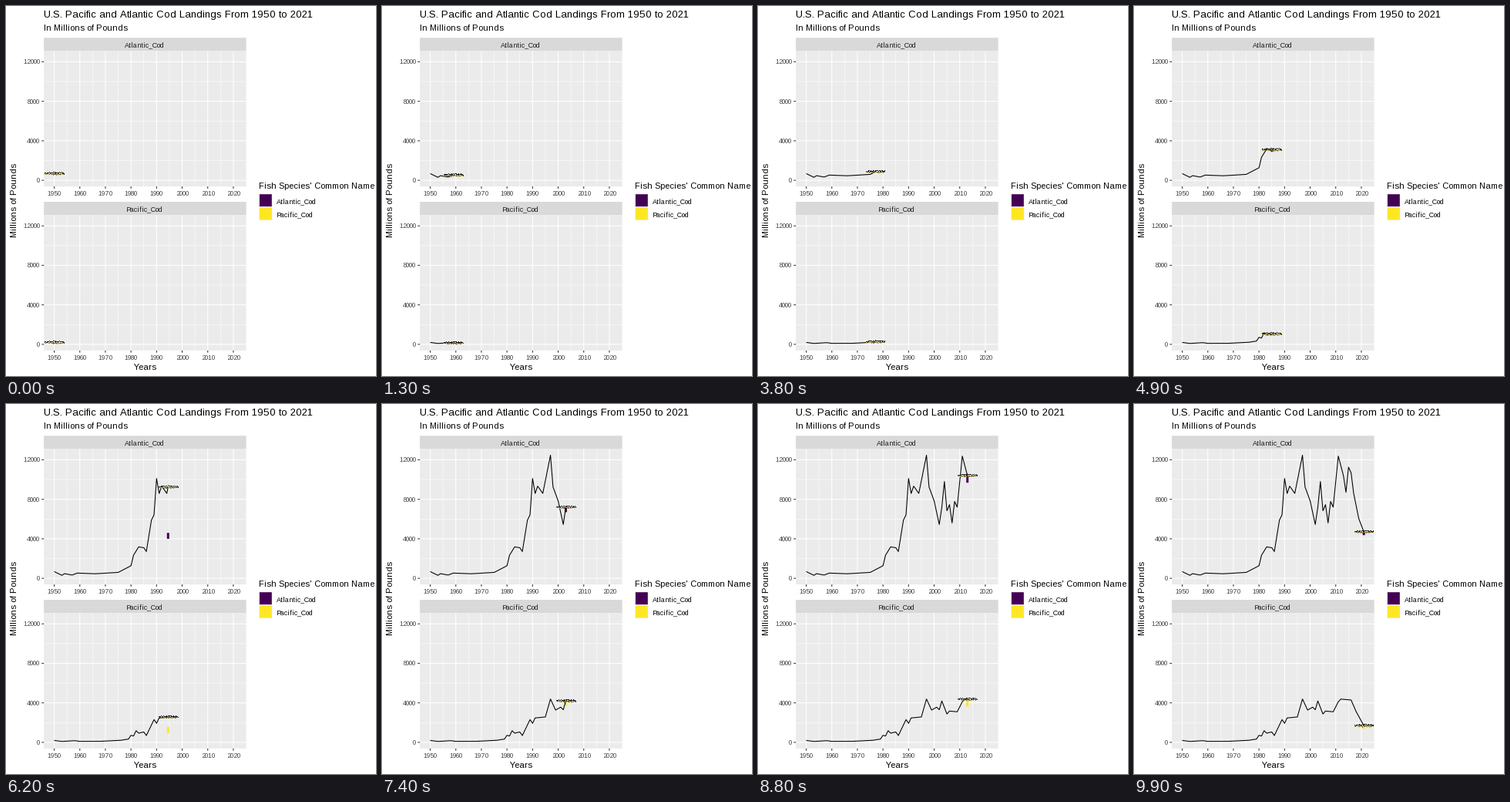
Animation, 480 px wide and 480 px high, one loop 10 s. Source, as a matplotlib script:

```python
import numpy as np
import matplotlib.pyplot as plt
from matplotlib.animation import FuncAnimation
from matplotlib.patches import Rectangle

# Whole-pixel letter spacing.
plt.rcParams.update({"font.family": "Liberation Sans",
                     "text.hinting": "force_autohint",
                     "text.hinting_factor": 1})

SIZE, FRAMES, STEP = 480, 100, 100
LEFT, RIGHT, HEIGHT = 49.15, 311.65, 175.6
PURPLE, YELLOW = "#440154", "#FDE725"
YEARS = np.arange(1950, 2022)

# Every year is snapped to a whole step of the reveal.
KEYS = np.round((FRAMES - 1) * (YEARS - 1950) / 71)


def series(turns):
    """Yearly values from the turning points, {year: millions}."""
    return np.interp(YEARS, list(turns), list(turns.values()))


ATLANTIC = series({
    1950: 680, 1953: 300, 1954: 470, 1957: 330, 1959: 530, 1966: 460,
    1975: 600, 1980: 1270, 1981: 2340, 1983: 3180, 1985: 3100, 1986: 2710,
    1988: 5900, 1989: 6420, 1990: 10110, 1991: 8590, 1992: 9330, 1994: 8600,
    1997: 12464, 1998: 9250, 2000: 7840, 2002: 5450, 2003: 7200, 2004: 9800,
    2005: 6840, 2006: 7460, 2007: 5600, 2008: 7780, 2009: 7210, 2011: 12380,
    2013: 10410, 2014: 8710, 2015: 11250, 2016: 10700, 2017: 8610,
    2019: 6050, 2021: 4700})
PACIFIC = series({
    1950: 190, 1953: 90, 1958: 170, 1960: 100, 1968: 105, 1976: 210,
    1979: 330, 1980: 710, 1981: 640, 1982: 1180, 1983: 930, 1985: 1050,
    1986: 690, 1989: 2300, 1990: 1930, 1991: 2470, 1995: 2570, 1997: 4390,
    1999: 3270, 2001: 3560, 2002: 3300, 2003: 4190, 2005: 2870, 2006: 3170,
    2009: 3090, 2011: 4110, 2012: 4380, 2016: 4290, 2018: 3100, 2021: 1690})


def speckles():
    """Specks of the fish marker: dark ragged back, paler belly, fins."""
    rng = np.random.default_rng(4)
    x = np.arange(-12, 13.1, .75)
    bulge = np.sin(np.pi * (x + 12) / 25)
    back = np.c_[x, -.4 - .8 * bulge + rng.normal(0, .35, x.size)]
    side = np.c_[x, .4 + .3 * bulge + rng.normal(0, .3, x.size)]
    belly = np.c_[x, .6 + bulge * rng.uniform(.2, 2, x.size)][::2]
    dots = np.vstack([side, belly, back])
    colors = np.concatenate([rng.choice(["#8a8440", "#4d4828"], x.size),
                             rng.choice(["#c9bd6a", "#8a8440"], len(belly)),
                             np.full(x.size, "#1c1a12")])
    return dots, colors


FISH, FISH_COLORS = speckles()

fig = plt.figure(figsize=(SIZE / 72, SIZE / 72), dpi=72, facecolor="white")
ax = fig.add_axes([0, 0, 1, 1])
ax.set_xlim(0, SIZE)
ax.set_ylim(SIZE, 0)
ax.axis("off")


def px(year):
    return LEFT + (year - 1945.95) * (RIGHT - LEFT) / 79.1


def box(x0, y0, x1, y1, color, z=1):
    return ax.add_patch(Rectangle((x0, y0), x1 - x0, y1 - y0, fc=color,
                                  lw=0, zorder=z, snap=False))


def rule(xs, ys, color, lw, z=2):
    return ax.plot(xs, ys, color=color, lw=lw, zorder=z, snap=False,
                   solid_capstyle="butt", solid_joinstyle="round")[0]


def label(x, y, text, size, color="black", ha="left", **kw):
    ax.text(x, y, text, fontsize=size, color=color, ha=ha,
            va=kw.pop("va", "baseline"), **kw)


class Panel:
    def __init__(self, name, top, values, color):
        self.top, self.values = top, values
        bottom = top + HEIGHT
        box(LEFT, top - 17.3, RIGHT, top, "#D9D9D9")
        box(LEFT, top, RIGHT, bottom, "#EBEBEB")
        label((LEFT + RIGHT) / 2, top - 5.2, name, 8.8, "#1A1A1A", "center")
        for year in range(1950, 2021, 5):
            major = year % 10 == 0
            x = px(year)
            rule([x, x], [top, bottom], "white", 1.07 if major else .53)
            if major:
                rule([x, x], [bottom, bottom + 2.8], "#333333", 1.07)
                label(x, bottom + 12, str(year), 8.8, "#4D4D4D", "center")
        for value in range(0, 12001, 2000):
            major = value % 4000 == 0
            y = self.py(value)
            rule([LEFT, RIGHT], [y, y], "white", 1.07 if major else .53)
            if major:
                rule([LEFT - 2.8, LEFT], [y, y], "#333333", 1.07)
                label(LEFT - 5, y + 3, str(value), 8.8, "#4D4D4D", "right")
        self.bar = box(0, 0, 0, 0, color, 3)
        self.line = rule([], [], "black", 1.07, 4)
        self.fish = ax.scatter(*FISH.T, s=1, marker="s", lw=0,
                               c=FISH_COLORS, zorder=5)

    def py(self, value):
        return self.top + (13087 - value) * HEIGHT / 13710

    def update(self, i):
        year = np.interp(i, KEYS, YEARS)
        x, y = px(year), self.py(np.interp(year, YEARS, self.values))
        past = YEARS < year
        self.line.set_data(np.append(px(YEARS[past]), x),
                           np.append(self.py(self.values[past]), y))
        self.fish.set_offsets(FISH + (x, y))

        # On a year the bar is the top slice; between years it drops halfway.
        n, part = int(year) - 1950, year % 1
        total, slab = self.values[n], .07 * ATLANTIC[n]
        low = (1 - part) * (total - slab)
        high = (1 - part) * total + part * slab
        half = .45 * (px(1) - px(0))
        self.bar.set_bounds(x - half, self.py(high), 2 * half,
                            self.py(low) - self.py(high))
        return [self.bar, self.line, self.fish]


panels = [Panel("Atlantic_Cod", 58.5, ATLANTIC, PURPLE),
          Panel("Pacific_Cod", 271.3, PACIFIC, YELLOW)]

label(49, 15, "U.S. Pacific and Atlantic Cod Landings From 1950 to 2021", 13.2)
label(49, 32, "In Millions of Pounds", 11)
label(180.5, 472, "Years", 11, ha="center")
label(16, 252, "Millions of Pounds", 11, ha="right", va="center", rotation=90)

label(328.2, 237, "Fish Species' Common Name", 11)
for y, name, color in ((243.5, "Atlantic_Cod", PURPLE),
                       (260.8, "Pacific_Cod", YELLOW)):
    box(328.2, y, 345.5, y + 17.3, "#F2F2F2")
    box(328.9, y + .7, 344.8, y + 16.6, color, 2)
    label(351, y + 12.4, name, 8.8)


def update(i):
    return [artist for p in panels for artist in p.update(i)]


anim = FuncAnimation(fig, update, frames=FRAMES, interval=STEP,
                     repeat=True, repeat_delay=0, blit=False)
plt.show()
```
